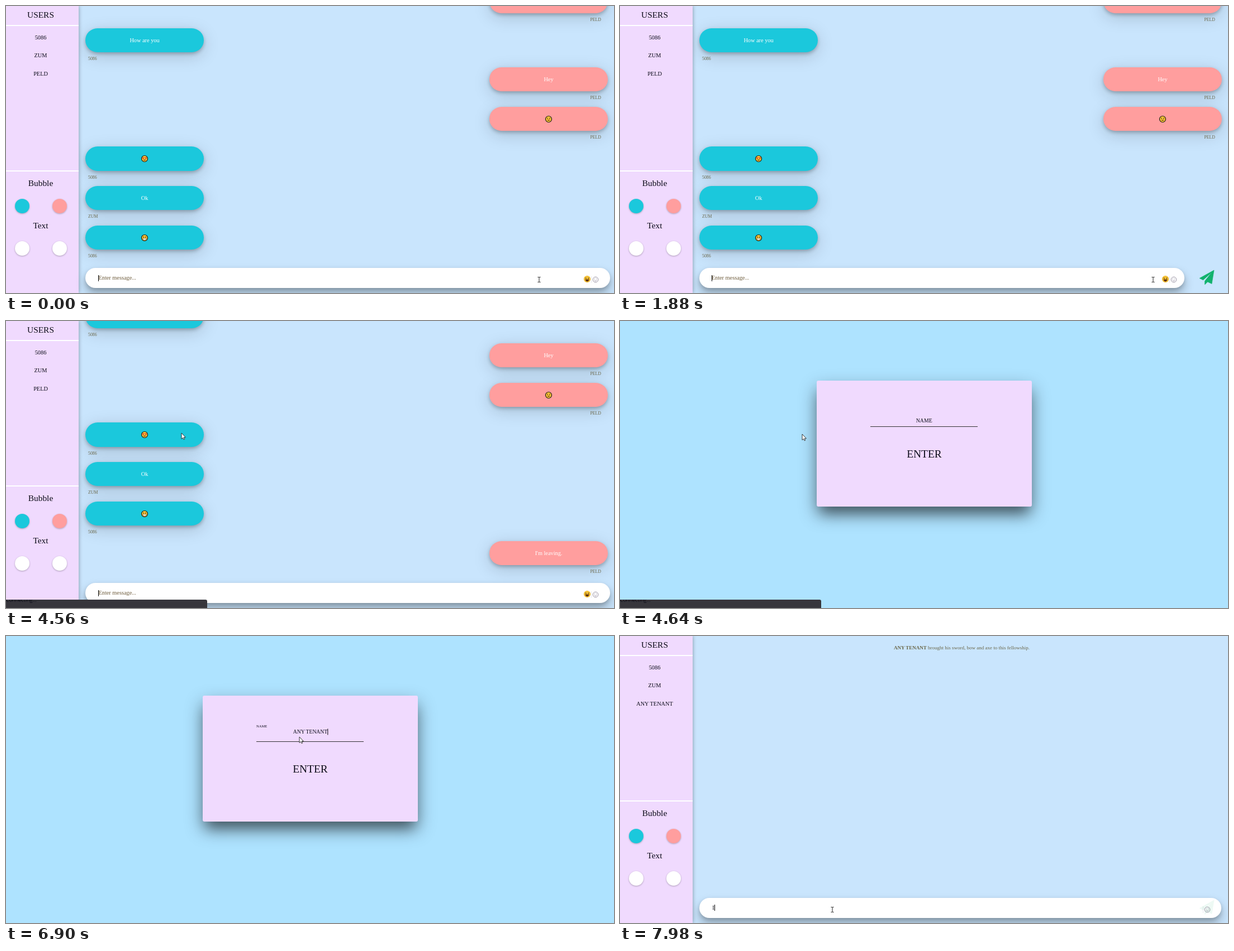
An HTML page for the animation above (8000 ms loop, 1088 by 515 pixels).

```html
<!DOCTYPE html>
<html lang="en">
<head>
<meta charset="utf-8">
<title>Chat room</title>
<style>
html, body { margin: 0; width: 100%; height: 100%; overflow: hidden; }
body { font-family: "Liberation Serif", "Times New Roman", serif; color: #0c0c18; }
#stage { position: relative; width: 1088px; height: 515px; overflow: hidden; background: #c9e5fd; }
#stage div, #stage span, #stage svg { position: absolute; }
#stage svg { overflow: visible; width: 1px; height: 1px; }
span { white-space: pre; line-height: 1.15; }
.c { transform: translate(-50%, -50%); }
.l { transform: translate(0, -50%); }
.r { transform: translate(-100%, -50%); }
.caret::after { content: ""; position: absolute; left: 100%; top: 50%; width: 1px; height: 11px; margin-top: -5.5px; background: #000; }
#side { left: 0; top: 0; width: 130px; height: 515px; background: #f0dafe; box-shadow: 1px 0 6px rgba(0,0,0,.28); }
.rule { left: 0; width: 130px; height: 2px; background: #fff; }
.dot { width: 26px; height: 26px; border-radius: 50%; box-shadow: 0 1px 3px rgba(0,0,0,.28); }
.bubble { width: 212px; border-radius: 22px; box-shadow: 0 3px 6px rgba(0,0,0,.24), 0 7px 30px rgba(0,0,0,.17); }
#bar { left: 142px; top: 470px; height: 35.5px; border-radius: 18px; background: #fff; box-shadow: 0 3px 6px rgba(0,0,0,.14), 0 10px 18px rgba(0,0,0,.28); }
#login { inset: 0; background: #aee3ff; }
#card { left: 352px; top: 107px; width: 385px; height: 225.5px; border-radius: 3px; background: #f0dafe;
  box-shadow: 0 14px 32px rgba(0,0,0,.42), 0 18px 22px -8px rgba(0,0,0,.36); }
#line { left: 448px; top: 188.5px; width: 192px; height: 1px; background: #333; }
#status { left: 0; top: 500px; width: 360px; height: 15px; border-radius: 0 3px 0 0; background: #37363c; overflow: hidden; }
#status span { left: -2px; top: 8px; font: 9px "Open Sans", sans-serif; color: #a5a5ab; }
</style>
</head>
<body>
<div id="stage"></div>
<script>
const TEAL = '#1bc8dc', PINK = '#ff9e9e', OLIVE = '#6a6648';
const NEWCOMER = 'ANY TENANT';
const JOIN_TIME = 6930, LOGIN_TIME = 4640, FOCUS_TIME = 5150, SEND_TIME = 1870, SCROLL_TIME = 1960;

const text = (x, y, size, string, { align = 'c', color = 'inherit', id = '' } = {}) =>
  `<span id="${id}" class="${align}" style="left:${x}px;top:${y}px;font-size:${size}px;color:${color}">${string}</span>`;

const svg = (x, y, body, id = '') =>
  `<svg id="${id}" style="left:${x}px;top:${y}px" fill="none">${body}</svg>`;

const dot = (x, y, color) =>
  `<div class="dot" style="left:${x - 13}px;top:${y - 13}px;background:${color}"></div>`;

const heart = x => `<path d="M${x} .8L${x - 1.9}-1.4Q${x - 1.2}-3.3 ${x}-2Q${x + 1.2}-3.3 ${x + 1.9}-1.4Z" fill="#d8382c"/>`;
const roundEyes = '<ellipse cx="-1.9" cy="-1.4" rx=".8" ry="1.1" fill="#402c10"/><ellipse cx="1.9" cy="-1.4" rx=".8" ry="1.1" fill="#402c10"/>';
const squint = '<path d="M-3.3-2.4L-1.2-1.4-3.3-.5M3.3-2.4L1.2-1.4 3.3-.5" stroke="#402c10" stroke-width=".8"/>';
const faces = {
  smile: roundEyes + '<path d="M-3 1.2Q0 4.8 3 1.2Z" fill="#704018"/>',
  love: heart(-2.3) + heart(2.3) + '<path d="M-2.8 1.7Q0 5 2.8 1.7Z" fill="#5c3010"/>',
  grin: roundEyes + '<path d="M-3.4 .9H3.4Q2.8 4 0 4T-3.4 .9Z" fill="#fff" stroke="#604018" stroke-width=".6"/>',
  laugh: squint + '<path d="M-3.4 .6H3.4Q3 4.4 0 4.4T-3.4 .6Z" fill="#5c3010"/>'
};
const emoji = (kind, outline = '#1c1c14') =>
  `<circle r="5.5" fill="#fbc637" stroke="${outline}" stroke-width="1.2"/>` + faces[kind];

function message(name, top, content, mine = false) {
  const isFace = content in faces, height = isFace ? 43.5 : 42.5;
  const left = mine ? 865 : 142;
  const inner = isFace ? svg(106, 22, emoji(content)) : text(106, 21.5, 10.3, content, { color: '#fff' });
  return `<div class="bubble" style="left:${left}px;top:${top}px;height:${height}px;background:${mine ? PINK : TEAL}">${inner}</div>` +
    text(mine ? 1065 : 147, top + height + 12, 7.8, name, { align: mine ? 'r' : 'l', color: OLIVE });
}

const stage = document.getElementById('stage');
stage.innerHTML = `
<div id="log">
  ${message('PELD', -30, '', true)}
  ${message('5086', 40, 'How are you')}
  ${message('PELD', 110, 'Hey', true)}
  ${message('PELD', 180.5, 'smile', true)}
  ${message('5086', 252, 'love')}
  ${message('ZUM', 323.3, 'Ok')}
  ${message('5086', 393.6, 'grin')}
  <div id="reply">${message('PELD', 465, "I'm leaving.", true)}</div>
</div>
${text(611.5, 20.5, 9, `<b>${NEWCOMER}</b> brought his sword, bow and axe to this fellowship.`, { color: OLIVE, id: 'joined' })}
<div id="side">
  ${text(62, 15.5, 15.4, 'USERS')}
  <div class="rule" style="top:33.5px"></div>
  <div id="users">
    ${text(62, 56.5, 10.3, '5086')}${text(62, 89, 10.3, 'ZUM')}${text(62, 121.5, 10.3, '', { id: 'third' })}
  </div>
  <div class="rule" style="top:294.5px"></div>
  ${text(62, 317.5, 15.4, 'Bubble')}${dot(29, 359, TEAL)}${dot(96, 359, PINK)}
  ${text(62, 394, 15.4, 'Text')}${dot(29, 434.5, '#fff')}${dot(96, 434.5, '#fff')}
</div>
<div id="bar">
  ${text(0, 18, 10.3, 'Enter message...', { align: 'l', color: '#6e5c3c', id: 'hint' })}
  ${text(0, 18, 10.3, '', { align: 'l', id: 'draft' })}
  ${svg(0, 20, emoji('laugh', '#e9b52c'), 'recent')}
  ${svg(0, 20.5, `<path d="M-7.5-6V6" stroke="#e4e4ea" stroke-width=".8"/>
    <circle r="4.8" stroke="#9c96a6"/><circle cx="-1.7" cy="-1.2" r=".7" fill="#9c96a6"/><circle cx="1.7" cy="-1.2" r=".7" fill="#9c96a6"/>
    <path d="M-2.5 1.2Q0 3.8 2.5 1.2" stroke="#9c96a6" stroke-width=".9"/>`, 'picker')}
</div>
${svg(1037, 474, '<path d="M26 0L0 14.5 6.5 17.7 21.5 4.5 9.5 19.5V26L14.5 21 22 24.5Z" fill="#10b26c" stroke="#10b26c" stroke-width=".6" stroke-linejoin="round"/>', 'send')}
<div id="login">
  <div id="card"></div>
  <div id="line"></div>
  ${text(0, 0, 10, 'NAME', { align: 'l', id: 'label' })}
  ${text(544.5, 172, 9.67, '', { id: 'name' })}
  ${text(544.5, 239, 19.4, 'ENTER')}
</div>
<div id="status">${text(0, 0, 9, 'Connecting...', { align: 'l' })}</div>
${svg(0, 0, '<path d="M0 0V10.6L2.5 8.4 4.1 11.8 5.7 11 4.2 7.8H7.4Z" fill="#fff" stroke="#222" stroke-width=".9"/>', 'arrow')}
${svg(0, 0, '<path d="M-2.5-4.5H-.6L0-4 .6-4.5H2.5M0-4V4M-2.5 4.5H-.6L0 4 .6 4.5H2.5" stroke="#222"/>', 'beam')}`;

const ui = {};
stage.querySelectorAll('[id]').forEach(node => { if (node.id) ui[node.id] = node; });

const show = (node, visible) => { node.style.display = visible ? '' : 'none'; };
const place = (node, x, y) => { node.style.left = x + 'px'; if (y !== undefined) node.style.top = y + 'px'; };
const setText = (node, string) => { if (node.textContent !== string) node.textContent = string; };
const typed = (string, keyTimes, t) => string.slice(0, keyTimes.filter(k => k <= t).length);
const mix = (a, b, p) => a + (b - a) * p;

// The CSS "ease" curve, cubic-bezier(.25, .1, .25, 1).
function ease(x) {
  if (x <= 0) return 0;
  if (x >= 1) return 1;
  const bezier = (a, b, s) => 3 * a * s * (1 - s) ** 2 + 3 * b * s * s * (1 - s) + s ** 3;
  let low = 0, high = 1;
  for (let i = 0; i < 20; i++) {
    const mid = (low + high) / 2;
    if (bezier(.25, .25, mid) < x) low = mid; else high = mid;
  }
  return bezier(.1, 1, low);
}

const replyKeys = [350, 620, 850, 1080, 1190, 1260, 1340, 1410, 1480, 1480, 1570, 1570];
const nameKeys = [5660, 5720, 5780, 5850, 6200, 6450, 6510, 6570, 6640, 6700];

const pointerPath = [
  [0, 954, 491], [2500, 954, 491], [2600, 884, 484], [3130, 390, 163], [3350, 84, -6],
  [3400, 84, -20], [3850, 100, -20], [4560, 314, 201], [4640, 326, 203], [5100, 526, 182],
  [6890, 526, 182], [6900, 525, 181], [7330, 525, 181], [7750, 379.5, 491], [8000, 379.5, 491]
];

function pointerAt(t) {
  const i = pointerPath.findIndex(point => point[0] > t);
  const [t0, x0, y0] = pointerPath[i - 1], [t1, x1, y1] = pointerPath[i];
  const p = (t - t0) / (t1 - t0);
  return [mix(x0, x1, p), mix(y0, y1, p)];
}

function drawChat(t) {
  const joined = t >= JOIN_TIME, scrolled = t >= SCROLL_TIME;
  show(ui.log, !joined);
  place(ui.log, 0, scrolled ? -70 : 0);
  show(ui.reply, scrolled);
  show(ui.joined, t >= 7330);
  show(ui.users, !joined || t >= 7130);
  setText(ui.third, joined ? NEWCOMER : 'PELD');

  const shrink = joined ? ease((t - 7940) / 500)
    : t < SEND_TIME ? ease((t - 350) / 500) : 1 - ease((t - SEND_TIME) / 500);
  const width = 939 - 72 * shrink, pickerX = width - 26 + 7 * shrink;
  ui.bar.style.width = width + 'px';
  place(ui.picker, pickerX);
  place(ui.recent, pickerX - 15);
  show(ui.picker, !joined || t >= 7130);
  show(ui.recent, !joined);
  ui.send.style.opacity = shrink;

  const draft = joined ? typed('I', [7940], t) : t < 1840 ? typed("I'm leaving.", replyKeys, t) : '';
  setText(ui.draft, draft);
  show(ui.hint, !draft);
  place(ui.hint, width * .025);
  place(ui.draft, width * .025);
  const blinkedOff = t >= 2350 && t < 2850;
  ui.draft.classList.toggle('caret', joined ? t >= 7800 : !blinkedOff);
}

function drawLogin(t) {
  show(ui.login, t >= LOGIN_TIME && t < JOIN_TIME);
  const p = ease((t - FOCUS_TIME) / 300);
  place(ui.label, mix(529.8, 448, p), mix(179, 161.5, p));
  ui.label.style.fontSize = mix(9.8, 6.5, p) + 'px';
  setText(ui.name, typed(NEWCOMER, nameKeys, t));
  ui.name.classList.toggle('caret', t >= FOCUS_TIME && !(t >= 6030 && t < 6200));
}

function drawPointer(t) {
  const [x, y] = pointerAt(t);
  const overText = y > 470 || (t > LOGIN_TIME && t < 6900 && x > 448);
  show(ui.beam, overText);
  show(ui.arrow, !overText);
  place(overText ? ui.beam : ui.arrow, x, y);
}

function frame() {
  const t = performance.now() % 8000;
  drawChat(t);
  drawLogin(t);
  show(ui.status, t >= 3470 && t < 4800);
  drawPointer(t);
  requestAnimationFrame(frame);
}
frame();
</script>
</body>
</html>
```
